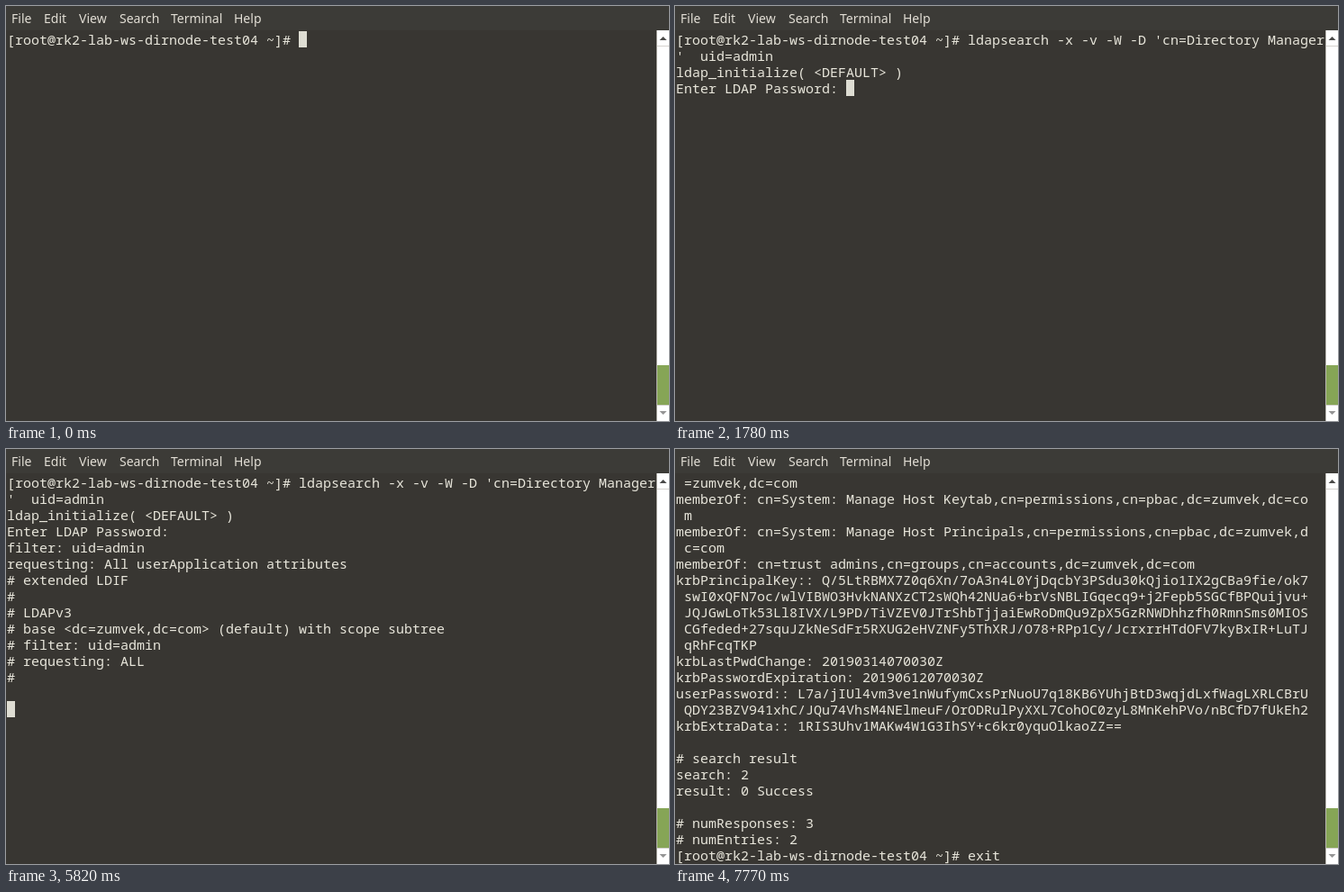
These frames come from a looping animation (736x461 px, 8770 ms). An HTML page:

```html
<!DOCTYPE html>
<html lang="en">
<head>
<meta charset="utf-8">
<title>Terminal session</title>
<style>
html, body { margin: 0; width: 100%; height: 100%; overflow: hidden; background: #383632; }
#stage { position: relative; width: 736px; height: 461px; overflow: hidden; background: #383632; }
#stage > *, #menu span { position: absolute; }
#menu { left: 0; top: 0; width: 736px; height: 27px; background: #3c3b37; color: #e2ded5;
  font: 14px/27px "Noto Sans", "Open Sans", sans-serif; }
#screen { left: 1px; top: 28px; margin: 0; color: #e8e6db;
  font: 15px/18px "Noto Sans Mono", monospace; white-space: pre; font-variant-ligatures: none; }
#cursor { width: 9px; height: 18px; background: #deddd3; }
#bar { left: 722px; top: 27px; }
</style>
</head>
<body>
<div id="stage">
  <div id="menu">
    <span style="left:6px">File</span><span style="left:42px">Edit</span>
    <span style="left:81px">View</span><span style="left:126px">Search</span>
    <span style="left:183px">Terminal</span><span style="left:253px">Help</span>
  </div>
  <pre id="screen"></pre>
  <div id="cursor"></div>
  <svg id="bar" width="14" height="434" shape-rendering="crispEdges">
    <path fill="#fff" d="M0 0H14V434H0Z"/>
    <path fill="#bab8b3" d="M0 0H1V434H0Z"/>
    <path fill="#d4d2ce" d="M1 17H14V18H1ZM1 416H14V417H1Z"/>
    <path fill="#86a556" d="M1 372H14V416H1Z"/>
    <g shape-rendering="auto">
      <path fill="#4a4a48" d="M3.500 11L7.500 7L11.500 11Z"/>
      <path fill="#949494" d="M3.500 423L7.500 427L11.500 423Z"/>
    </g>
  </svg>
</div>
<script>
const LOOP = 8770, COL = 9, ROW = 18;
const screen = document.getElementById("screen");
const cursor = document.getElementById("cursor");

const prompt = "[root@rk2-lab-ws-dirnode-test04 ~]# ";
const org = "zumvek";

// Invented key text
let seed = 41;
const alphabet = "ABCDEFGHIJKLMNOPQRSTUVWXYZabcdefghijklmnopqrstuvwxyz0123456789+/";
function key(length) {
  let s = "";
  while (s.length < length) {
    seed = (seed * 1664525 + 1013904223) % 4294967296;
    s += alphabet[Math.floor(seed / 4294967296 * alphabet.length)];
  }
  return s;
}

const command = prompt + "ldapsearch -x -v -W -D 'cn=Directory Manager\n'  uid=admin";
const started = command + "\n";
const asking = started + "ldap_initialize( <DEFAULT> )\nEnter LDAP Password: ";
const entered = asking + "\n";
const header = entered + `filter: uid=admin
requesting: All userApplication attributes
# extended LDIF
#
# LDAPv3
# base <dc=${org},dc=com> (default) with scope subtree
# filter: uid=admin
# requesting: ALL
#

`;
const result = ` =${org},dc=com
memberOf: cn=System: Manage Host Keytab,cn=permissions,cn=pbac,dc=${org},dc=co
 m
memberOf: cn=System: Manage Host Principals,cn=permissions,cn=pbac,dc=${org},d
 c=com
memberOf: cn=trust admins,cn=groups,cn=accounts,dc=${org},dc=com
krbPrincipalKey:: ${key(60)}
 ${key(77)}
 ${key(77)}
 ${key(77)}
 ${key(9)}
krbLastPwdChange: 20190314070030Z
krbPasswordExpiration: 20190612070030Z
userPassword:: ${key(63)}
 ${key(77)}
krbExtraData:: ${key(38)}==

# search result
search: 2
result: 0 Success

# numResponses: 3
# numEntries: 2
`;

// [start in ms, text, cursor shown]
const steps = [
  [0, prompt, true],
  [790, command, true],
  [1730, started, true],
  [1780, asking, true],
  [5350, entered, true],
  [5820, header, true],
  [5920, result, true],
  [7260, result + prompt + "e", true],
  [7450, result + prompt + "ex", true],
  [7560, result + prompt + "exi", false],
  [7770, result + prompt + "exit", false]
];

let shown;
function show(step) {
  if (step === shown) return;
  shown = step;
  const [, text, visible] = step;
  const lines = text.split("\n");
  screen.textContent = text;
  cursor.style.left = 1 + lines.at(-1).length * COL + "px";
  cursor.style.top = 28 + (lines.length - 1) * ROW + "px";
  cursor.style.visibility = visible ? "visible" : "hidden";
}

const begin = performance.now();
function tick() {
  const t = (performance.now() - begin) % LOOP;
  show(steps.findLast(step => step[0] <= t));
  requestAnimationFrame(tick);
}
tick();
</script>
</body>
</html>
```
